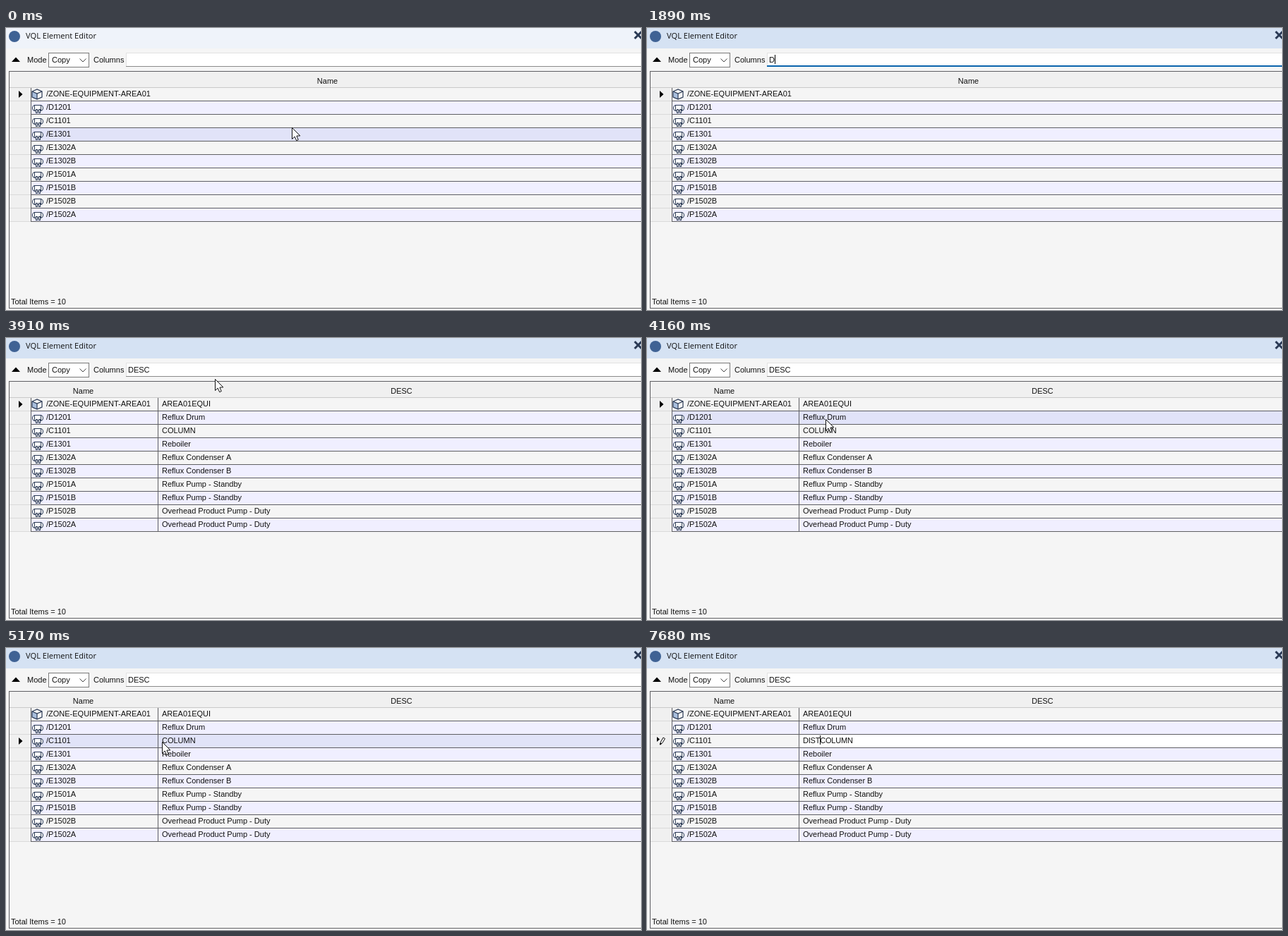
An HTML page with a canvas that plays this animation: 900 px wide and 400 px high, repeating every 8000 ms.

```html
<!DOCTYPE html>
<html lang="en">
<head>
<meta charset="utf-8">
<title>Members grid</title>
<style>
html, body { margin: 0; width: 100%; height: 100%; overflow: hidden; background: #f5f5f5; }
canvas { display: block; width: 900px; height: 400px; }
</style>
</head>
<body>
<canvas id="stage" width="900" height="400"></canvas>
<script>
const ctx = document.getElementById("stage").getContext("2d");
const LOOP = 8000;
const UI = "11px 'Liberation Sans', Arial, sans-serif";
const TITLE = "11.1px 'Open Sans', 'Noto Sans', sans-serif";
const TIP = "10.5px 'Open Sans', 'Noto Sans', sans-serif";
const INK = "#111", LINE = "#5f5f63", NAVY = "#2b3a55";
const TOP = 85, ROW = 19, LEFT = 36, SPLIT = 215;

const rows = [
  ["/ZONE-EQUIPMENT-AREA01", "AREA01EQUI"],
  ["/D1201", "Reflux Drum"],
  ["/C1101", "COLUMN"],
  ["/E1301", "Reboiler"],
  ["/E1302A", "Reflux Condenser A"],
  ["/E1302B", "Reflux Condenser B"],
  ["/P1501A", "Reflux Pump - Standby"],
  ["/P1501B", "Reflux Pump - Standby"],
  ["/P1502B", "Overhead Product Pump - Duty"],
  ["/P1502A", "Overhead Product Pump - Duty"]
];

// Each track holds its value until the next time: [ms, value]
const pointer = [
  [0, ["arrow", 405, 141]], [130, ["arrow", 376, 116]], [250, ["arrow", 322, 62]],
  [380, ["beam", 307, 42]], [1890, null],
  [3030, ["arrow", 304, 41]], [3910, ["arrow", 296, 58]], [4030, ["arrow", 274, 90]],
  [4160, ["arrow", 253, 115]], [4280, ["arrow", 234, 127]], [4410, ["arrow", 222, 134]],
  [5170, ["arrow", 221, 133]], [5420, ["beam", 223, 133]], [7060, null]
];
const hover = [[0, 3], [130, 1], [250, -1], [4030, 0], [4160, 1], [4280, 2], [5420, -1]];
const query = [[0, ""], [1890, "D"], [2010, "DE"], [2260, "DES"], [2510, "DESC"]];
const queryCaret = [[0, false], [760, true], [1510, false], [1890, true], [3030, false]];
const prefix = [[0, ""], [7060, "D"], [7170, "DI"], [7430, "DIS"], [7680, "DIST"]];
const cellCaret = [[0, false], [5420, true], [5930, false], [6540, true]];

function at(track, t) {
  let value = track[0][1];
  for (const [start, v] of track) if (t >= start) value = v;
  return value;
}
const during = (t, from, to) => t >= from && t < to;

function box(x, y, w, h, fill) {
  ctx.fillStyle = fill;
  ctx.fillRect(x, y, w, h);
}
function frame(x, y, w, h, fill, edge) {
  box(x, y, w, h, edge);
  box(x + 1, y + 1, w - 2, h - 2, fill);
}
function text(s, x, y, font = UI, align = "left") {
  ctx.font = font;
  ctx.textAlign = align;
  ctx.fillStyle = INK;
  ctx.fillText(s, x, y);
}
function path(points, close) {
  ctx.beginPath();
  points.forEach(([x, y]) => ctx.lineTo(x, y));
  if (close) ctx.closePath();
}
function shape(points, fill) {
  path(points, true);
  ctx.fillStyle = fill;
  ctx.fill();
}
function stroke(points, color, width = 1, close = false) {
  path(points, close);
  ctx.strokeStyle = color;
  ctx.lineWidth = width;
  ctx.stroke();
}

function drawTitle(active) {
  box(0, 0, 900, 29, active ? "#d5e2f3" : "#eff3fa");
  ctx.beginPath();
  ctx.arc(12, 12, 8, 0, 7);
  ctx.fillStyle = "#3f6294";
  ctx.fill();
  text("VQL Element Editor", 28, 15, TITLE);
  stroke([[891, 5], [901, 15]], NAVY, 3);
  stroke([[901, 5], [891, 15]], NAVY, 3);
}

function drawToolbar(t) {
  shape([[8, 48], [14, 41.5], [20, 48]], "#000");
  text("Mode", 30, 49);
  frame(60, 35, 58, 21, "#fff", "#7a7a7a");
  text("Copy", 65, 49);
  stroke([[104.5, 43.5], [109, 48], [113.5, 43.5]], "#444");
  text("Columns", 124, 49);
  frame(170, 35, 740, 20, "#fff", "#e2e2e2");
  box(170, 54, 730, 1, "#8a8a8a");
  if (during(t, 880, 3910)) box(170, 53, 730, 2, "#0a64ad");
  const s = at(query, t);
  text(s, 173, 49);
  if (at(queryCaret, t)) box(173 + Math.round(ctx.measureText(s).width), 38, 1, 13, "#000");
}

function drawZone(x, y) {
  shape([[x, y + 4], [x + 7, y + 7], [x + 7, y + 15], [x, y + 12]], "#a9bfdd");
  stroke([[x, y + 4], [x + 7, y + 1], [x + 14, y + 4], [x + 14, y + 12],
    [x + 7, y + 15], [x, y + 12]], NAVY, 1.2, true);
  stroke([[x, y + 4], [x + 7, y + 7], [x + 14, y + 4]], NAVY, 1.2);
  stroke([[x + 7, y + 7], [x + 7, y + 15]], NAVY, 1.2);
}

function drawVessel(x, y) {
  ctx.beginPath();
  ctx.roundRect(x + .5, y + 4.5, 15, 8, 4);
  ctx.fillStyle = "#fff";
  ctx.fill();
  ctx.strokeStyle = NAVY;
  ctx.lineWidth = 1.1;
  ctx.stroke();
  for (const dx of [3.5, 12.5]) stroke([[x + dx, y + 4], [x + dx, y + 13]], NAVY);
  for (const dx of [5, 9]) {
    box(x + dx, y + 10, 3, 6, NAVY);
    box(x + dx + 1, y + 11, 1, 4, "#fff");
  }
}

function drawMarker(row, editing) {
  const y = TOP + row * ROW + 9;
  if (!editing) return shape([[18, y - 5], [23.5, y], [18, y + 5]], "#000");
  shape([[14, y - 6], [18, y - 2.5], [14, y + 1]], "#000");
  stroke([[18.5, y + 5], [19.5, y + 1], [23, y - 5], [25.5, y - 3.5], [22, y + 2.5]], "#111", 1, true);
  stroke([[18.5, y + 5], [20, y + 3]], "#000", 2);
}

function drawGrid(t) {
  const split = t >= 3030, edit = t >= 5420, hot = at(hover, t);
  box(4, 61, 896, 337, LINE);
  box(5, 62, 895, 335, "#f5f5f5");
  box(5, 62, 895, 22, "#f0f0f0");
  box(5, 84, 895, 1, "#c9c9c9");
  box(5, TOP, 30, ROW * rows.length, "#f0f0f0");
  text("Name", split ? 109.5 : 455.5, 79, UI, "center");
  if (split) text("DESC", 560.5, 79, UI, "center");

  rows.forEach(([name, desc], i) => {
    const y = TOP + i * ROW;
    box(LEFT, y, 864, 18, i === hot ? "#e1e3f8" : i % 2 ? "#f0efff" : "#f5f5f5");
    box(LEFT, y + 18, 864, 1, LINE);
    box(5, y + 18, 30, 1, "#dadada");
    (i ? drawVessel : drawZone)(37, y + 1);
    text(name, 57, y + 12);
    if (!split) return;
    if (i === 2 && edit) drawEdit(t, desc, y);
    else text(desc, 221, y + 12);
  });
  box(35, TOP, 1, ROW * rows.length, LINE);
  if (split) box(SPLIT, TOP, 1, ROW * rows.length, LINE);

  drawMarker(t >= 4910 ? 2 : 0, t >= 7060);
  text("Total Items = 10", 7, 392);
}

function drawEdit(t, desc, y) {
  const typed = at(prefix, t);
  box(SPLIT + 1, y, 900 - SPLIT, 18, "#fff");
  ctx.letterSpacing = "-0.2px";
  text(typed + desc, 221, y + 12);
  const x = 221 + Math.round(ctx.measureText(typed).width);
  ctx.letterSpacing = "0px";
  if (at(cellCaret, t)) box(x, y + 1, 1, 13, "#000");
}

function drawTip() {
  frame(222, 154, 165, 44, "#ffffe1", "#5c5c5c");
  ["Name: C1101", "Type: EQUIPMENT: Equipment", "Description: COLUMN"]
    .forEach((s, i) => text(s, 227, 167 + i * 12.5, TIP));
}

function drawPointer(p) {
  if (!p) return;
  const [kind, x, y] = p;
  if (kind === "beam") {
    box(x, y - 7, 1, 15, "#222");
    for (const dy of [-7, 7]) {
      box(x - 3, y + dy, 3, 1, "#222");
      box(x + 1, y + dy, 3, 1, "#222");
    }
    return;
  }
  const outline = [[0, 0], [0, 16], [3.7, 12.6], [6.2, 18.2], [8.8, 17], [6.4, 11.6], [11.4, 11.4]]
    .map(([dx, dy]) => [x + .5 + dx, y + .5 + dy]);
  shape(outline, "#fff");
  stroke(outline, "#111", 1, true);
}

function draw(t) {
  box(0, 0, 900, 400, "#f5f5f5");
  drawTitle(t >= 760);
  drawToolbar(t);
  drawGrid(t);
  if (during(t, 4540, 4780)) drawTip();
  if (during(t, 620, 880)) {
    ctx.globalCompositeOperation = "multiply";
    ctx.beginPath();
    ctx.arc(305, 41, 12, 0, 7);
    ctx.fillStyle = "#ffff6c";
    ctx.fill();
    ctx.globalCompositeOperation = "source-over";
  }
  drawPointer(at(pointer, t));
}

const start = performance.now();
function tick() {
  draw((performance.now() - start) % LOOP);
  requestAnimationFrame(tick);
}
tick();
</script>
</body>
</html>
```
